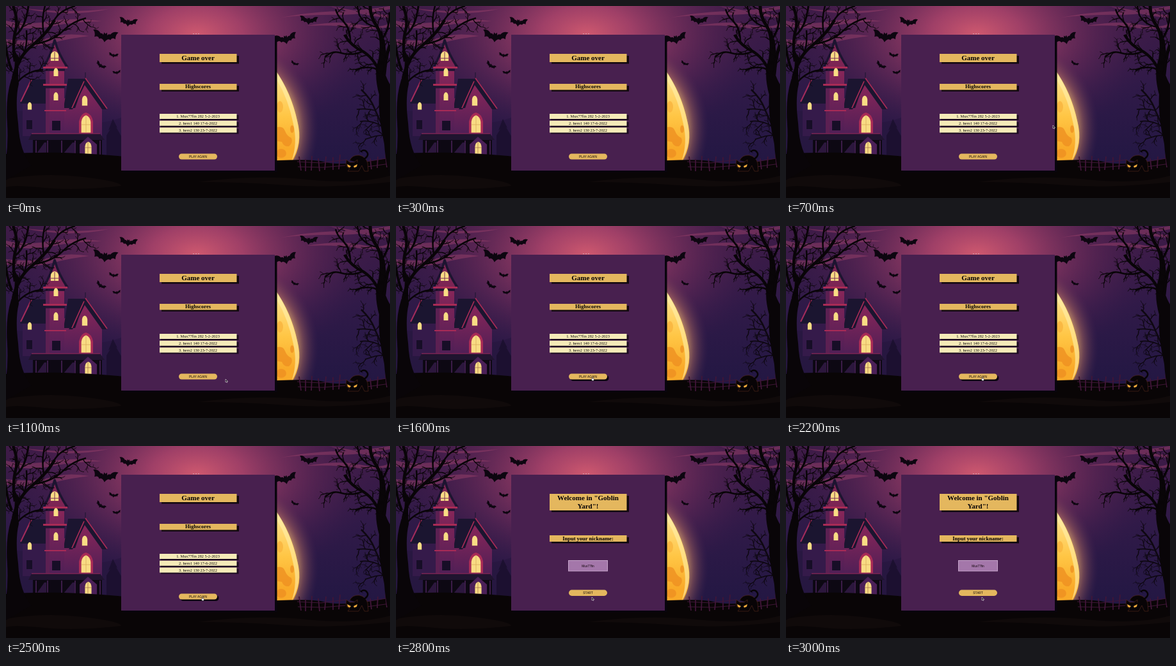
An HTML page that plays this animation: 600x301 px, repeating every 3.1 s.

```html
<!DOCTYPE html>
<html lang="en">
<head>
<meta charset="utf-8">
<title>Game over</title>
<style>
html, body { margin: 0; width: 100%; height: 100%; overflow: hidden; background: #080405; }
svg { position: absolute; left: 0; top: 0; display: block; }
.serif { font-family: "Liberation Serif", Times, serif; text-anchor: middle; fill: #050205; }
.sans { font: 4.8px "Liberation Sans", Arial, sans-serif; text-anchor: middle; fill: #100408; }
.h1 { font-size: 11px; font-weight: bold; }
.h2 { font-size: 8.5px; font-weight: bold; }
.row { font-size: 6.35px; }
.gold { fill: #e4b75e; }
.tree path { fill: none; stroke: #090508; stroke-linejoin: round; }
.tree .trunk { fill: #090508; stroke: none; }
.scores, .welcome, .hover, .arrow, .hand, .pointer { animation: 3.1s step-end infinite; }
.scores { animation-name: scores; }
.welcome { animation-name: welcome; }
.hover, .hand { animation-name: hover; }
.arrow { animation-name: arrow; }
.pointer { animation-name: move; }
@keyframes scores { 0% { opacity: 1 } 90.32%, 100% { opacity: 0 } }
@keyframes welcome { 0% { opacity: 0 } 90.32%, 100% { opacity: 1 } }
@keyframes hover { 0% { opacity: 0 } 41.93% { opacity: 1 } 90.32%, 100% { opacity: 0 } }
@keyframes arrow { 0% { opacity: 0 } 16.12% { opacity: 1 } 41.93% { opacity: 0 } 90.32%, 100% { opacity: 1 } }
@keyframes move {
  0% { transform: translate(468px, 150px) }
  16.12% { transform: translate(468px, 150px); animation-timing-function: steps(2) }
  22.57% { transform: translate(417px, 187px); animation-timing-function: steps(4) }
  35.48% { transform: translate(343px, 240px); animation-timing-function: steps(2) }
  41.93%, 100% { transform: translate(306px, 237px) }
}
</style>
</head>
<body>
<svg width="600" height="301" viewBox="0 0 600 301">
<defs>
  <linearGradient id="sky" x1="0" y1="0" x2="0" y2="1">
    <stop offset="0" stop-color="#3f1b47"/><stop offset=".4" stop-color="#301a48"/><stop offset=".85" stop-color="#221743"/>
  </linearGradient>
  <radialGradient id="haze" gradientUnits="userSpaceOnUse" cx="0" cy="0" r="1" gradientTransform="translate(298 45) scale(290 175)">
    <stop offset="0" stop-color="#cf596f"/><stop offset=".25" stop-color="#a8436a" stop-opacity=".92"/>
    <stop offset=".6" stop-color="#682a58" stop-opacity=".65"/><stop offset="1" stop-color="#3a1a4a" stop-opacity="0"/>
  </radialGradient>
  <radialGradient id="glow" gradientUnits="userSpaceOnUse" cx="0" cy="0" r="1" gradientTransform="translate(360 196) rotate(10) scale(128 140)">
    <stop offset=".7" stop-color="#f0bb70" stop-opacity=".85"/><stop offset=".82" stop-color="#a8685f" stop-opacity=".5"/>
    <stop offset="1" stop-color="#4a2552" stop-opacity="0"/>
  </radialGradient>
  <linearGradient id="moon" x1="0" y1="0" x2="0" y2="1">
    <stop offset=".1" stop-color="#ffe08a"/><stop offset=".5" stop-color="#ffc645"/><stop offset=".85" stop-color="#f9a928"/>
  </linearGradient>
  <linearGradient id="wall" x1="0" y1="0" x2="0" y2="1">
    <stop offset="0" stop-color="#8b2659"/><stop offset="1" stop-color="#4e1f56"/>
  </linearGradient>
  <path id="bat" d="M-18-7Q-11-9-7-3Q-4-4-3-1L-2-5L0-3L2-5L3-1Q4-4 7-3Q11-9 18-7Q14-3 15 3Q10 0 8 5Q4 2 0 9Q-4 2-8 5Q-10 0-15 3Q-14-3-18-7Z"/>
  <path id="lit" d="M-3.5 6V-2Q-3-6 0-7Q3-6 3.5-2V6Z" fill="#f9dc84"/>
</defs>

<rect width="600" height="301" fill="url(#sky)"/>
<rect width="600" height="260" fill="url(#haze)"/>
<g fill="#99406a" opacity=".5">
  <path d="M430 18Q480 9 520 8T600 0V5Q560 13 525 14Q475 13 430 18Z"/>
  <path d="M470 31Q520 22 552 29T600 27V33Q570 38 544 34Q510 29 470 31Z"/>
  <path d="M505 0Q545 8 600 15V19Q545 13 505 0Z"/>
  <path d="M0 23Q35 31 72 23Q108 18 150 24Q103 25 76 31Q38 39 0 32Z"/>
  <path d="M0 52Q44 58 78 47Q100 42 130 47Q98 51 80 56Q42 67 0 61Z"/>
  <path d="M25 3Q86 12 160 5Q96 19 25 3Z"/>
</g>
<path d="M0 168Q25 158 50 174T110 178Q140 190 180 175V250H0Z" fill="#27163f" opacity=".6"/>

<rect x="420" y="40" width="100" height="205" fill="url(#glow)"/>
<path d="M420 99Q446 136 455 180Q465 216 446 246H420Z" fill="url(#moon)"/>
<g fill="#ee8e20" opacity=".75">
  <path d="M424 190Q433 188 436 196T446 207Q449 214 442 220Q434 221 431 213L424 212Z"/>
  <ellipse cx="430" cy="231" rx="8" ry="7"/><ellipse cx="447" cy="193" rx="3" ry="6"/>
  <ellipse cx="428" cy="158" rx="5" ry="9" fill="#f9b33c"/>
</g>
<path d="M424 106Q446 140 455 180Q464 216 446 243Q456 216 449 185Q441 146 424 117Z" fill="#fff0ac" opacity=".6"/>

<path d="M157 238V203L163 193L160 195L167 177L174 191L172 190L180 204V240Z" fill="#1c1030"/>

<g>
  <path d="M26 148H66V204H26Z" fill="#351a4a"/>
  <path d="M39 115H62V153H22Z" fill="#1b1530"/>
  <path d="M40 115L23 150" stroke="#a32c5c" stroke-width="2"/>
  <path d="M90 146L122 119L150 158V204H90Z" fill="url(#wall)"/>
  <path d="M97 114H124L108 160H90Z" fill="#1b1530"/>
  <path d="M124 104V116" stroke="#1b1530"/>
  <path d="M124 113L158 162H150L123 124L104 162H98Z" fill="#1b1530"/>
  <path d="M124 113L158 161M122 118L103 160" fill="none" stroke="#a82b56" stroke-width="1.700"/>
  <path d="M62 94H91V204H62Z" fill="url(#wall)"/>
  <path d="M62 94H68V204H62Z" fill="#5c2052"/>
  <path d="M62 95Q66 72 76 60Q86 74 92 95Z" fill="#7c2554"/>
  <path d="M58 97Q70 78 76 53Q82 76 96 96" fill="none" stroke="#1d1430" stroke-width="3.500"/>
  <path d="M76 45V60" stroke="#1d1430"/>
  <path d="M58 95H96V98H58ZM58 122H95V125H58ZM60 163H94V165H60Z" fill="#a82b56"/>
  <path d="M62 98H92V102H62ZM62 125H92V129H62Z" fill="#241535"/>
  <use href="#lit" transform="translate(76 79) scale(1.75 1.15)"/>
  <path d="M76 72V87M70 82H82" stroke="#773052"/>
  <use href="#lit" x="78" y="104"/><use href="#lit" x="78" y="142"/>
  <use href="#lit" transform="translate(123 149) scale(1.2)"/>
  <use href="#lit" transform="translate(37 157) scale(.9)"/>
  <path d="M114 200V181Q117 168 125 167Q134 169 136 181V200Z" fill="#a82b56"/>
  <use href="#lit" transform="translate(125 186) scale(2.1)"/>
  <path d="M125 172V198M118 186H132" stroke="#d7a155" stroke-width=".7"/>
  <path d="M32 193V179H41V193ZM72 180H85V195H72Z" fill="#170e27"/>
  <path d="M40 200H147L154 210H35Z" fill="#20142f"/>
  <path d="M40 200H147" stroke="#7c2554" stroke-width="1.300"/>
  <path d="M42 210H150V234H42Z" fill="#0d0813"/>
  <path d="M47 211V233M65 211V233M87 211V233M108 211V233M147 211V233" stroke="#3c1c49" stroke-width="2"/>
  <path d="M48 231L60 214H63V231ZM90 231L104 214H107V231Z" fill="#2c173d"/>
  <path d="M115 233V217L128 205L142 217V233Z" fill="#4c2058"/>
  <use href="#lit" transform="translate(128.500 223) scale(1.45)"/>
  <path d="M128 213V231M123 222H134" stroke="#a36a4c" stroke-width=".7"/>
</g>

<path d="M0 232Q55 228 116 231T240 242T390 244T500 245T600 238V301H0Z" fill="#090506"/>
<path d="M0 271Q60 261 120 268T180 282Q110 290 60 285T0 284ZM300 276Q390 264 470 272T600 266V276Q510 286 440 281T300 276Z" fill="#100a0a"/>

<g fill="none" stroke="#401638">
  <path d="M455 244L492 246L532 241M456 252L495 253L530 250M563 244L600 238M564 252L600 247"/>
  <path d="M458 236L461 258M468 240V259M478 235L477 258M488 239L490 259M500 236L498 257M511 237V257M522 233L520 256M569 239L571 256M581 236L580 254M593 232L595 253" stroke-width="1.800"/>
</g>

<g class="tree" opacity=".85">
  <path class="limb" d="M600 211Q586 185 576 161Q570 145 555 131" stroke-width="2.500"/>
  <path class="limb" d="M578 164Q565 160 548 162M587 188Q570 178 553 181M589 191Q593 166 600 155M592 202L577 204L561 209" stroke-width="1.700"/>
</g>
<g class="tree">
  <path class="trunk" d="M-7 273Q5 231 2 185Q-1 144 8 116Q17 97 12 67L20 81Q18 104 20 122Q14 146 19 184Q21 228 40 250L0 273Z"/>
  <path class="limb" d="M11 113Q18 80 42 61Q63 44 76 22" stroke-width="4.500"/>
  <path class="limb" d="M14 87Q9 58 16 34Q18 17 11 0" stroke-width="4.500"/>
  <path class="limb" d="M42 60Q72 56 89 39Q104 24 125 19" stroke-width="2.500"/>
  <path class="limb" d="M59 44Q55 20 61 0" stroke-width="2.500"/>
  <path class="limb" d="M75 23Q83 7 108 0" stroke-width="2.500"/>
  <path class="limb" d="M15 46Q31 33 35 0" stroke-width="3"/>
  <path class="limb" d="M9 101Q2 84-2 53" stroke-width="4"/>
  <path class="limb" d="M16 122Q32 101 58 100" stroke-width="2.500"/>
  <path class="limb" d="M24 78Q34 70 32 38" stroke-width="2.500"/>
</g>
<g class="tree">
  <path class="trunk" d="M606 280Q594 260 591 216Q581 172 583 139Q574 106 582 84Q587 56 579 34L588 41Q598 76 592 105Q598 123 606 130Z"/>
  <path class="limb" d="M587 115Q580 86 559 72Q539 63 529 45" stroke-width="4.500"/>
  <path class="limb" d="M587 84Q593 55 579 31Q569 17 569 0" stroke-width="5"/>
  <path class="limb" d="M591 108Q594 75 600 61" stroke-width="5"/>
  <path class="limb" d="M558 71Q540 79 521 73Q508 70 499 80" stroke-width="2.500"/>
  <path class="limb" d="M538 58Q539 36 526 23Q518 16 515 5" stroke-width="2.500"/>
  <path class="limb" d="M580 33Q561 30 552 14L549 0" stroke-width="2.500"/>
  <path class="limb" d="M586 54Q600 37 599 10" stroke-width="3"/>
  <path class="limb" d="M581 99Q564 93 546 100" stroke-width="2.500"/>
</g>

<g fill="#0d0610">
  <use href="#bat" transform="translate(155 47) rotate(7) scale(1.1)"/>
  <use href="#bat" transform="translate(191 25) rotate(8) scale(.8)"/>
  <use href="#bat" transform="translate(437 51) rotate(-11) scale(.98)"/>
  <use href="#bat" transform="translate(473 22) rotate(5) scale(.8)"/>
  <use href="#bat" transform="translate(451 90) rotate(25) scale(.36)"/>
  <use href="#bat" transform="translate(168 77) rotate(9) scale(.42)"/>
  <use href="#bat" transform="translate(148 93) rotate(35) scale(.48)"/>
  <use href="#bat" transform="translate(173 104) rotate(-8) scale(.36)"/>
</g>

<g fill="#080406" stroke-linecap="round">
  <path d="M537 242Q541 233 552 234Q562 236 565 246L566 259H560L556 250L551 259H534L537 255Q529 252 532 241L537 245H544L549 241V245" stroke="#5a2a1c" stroke-width=".6"/>
  <path d="M561 239Q569 233 562 227Q558 225 555 228" fill="none" stroke="#080406" stroke-width="2.500"/>
  <path d="M533 248L539 251L537 253.500L534 252ZM543 251L549 248L548 252L544 253.500Z" fill="#f0a83a"/>
</g>

<path d="M292 43.500H294M296 43.500H298M300 43.500H302" stroke="#d8a9bc" stroke-width=".8"/>
<path d="M183 48H423.500V260.500H183Z" fill="#09050d"/>
<path d="M180 45H420V258H180Z" fill="#48204f"/>

<g class="scores">
  <path d="M243 78H364V90.500H243ZM243 125H364V134H243Z" fill="#12080f"/>
  <path class="gold" d="M240 75H360.500V88H240ZM240 122H360.500V131.500H240Z"/>
  <path d="M242 171H363.500V179H242ZM242 182H363.500V190H242ZM242 192.500H363.500V200.500H242Z" fill="#1c0c20"/>
  <path d="M240 169H360.500V177H240ZM240 179.700H360.500V187.700H240ZM240 190.400H360.500V198.400H240Z" fill="#f5ebb8"/>
  <g class="serif">
    <text class="h1" x="300" y="85">Game over</text>
    <text class="h2" x="300" y="129.400">Highscores</text>
    <text class="row" x="300" y="175.200">1. Mux77fin 282 5-2-2023</text>
    <text class="row" x="300" y="185.900">2. hero1 140 17-6-2022</text>
    <text class="row" x="300" y="196.600">3. hero2 130 23-7-2022</text>
  </g>
  <rect class="hover" x="272.500" y="234" width="60" height="9" rx="4.500" fill="#0d0610"/>
  <rect class="gold" x="270" y="231.500" width="60" height="9" rx="4.500"/>
  <text class="sans" x="300" y="237.700">PLAY AGAIN</text>
</g>

<g class="welcome">
  <path d="M243 78H364V103.500H243ZM243 143H364V152.500H243Z" fill="#12080f"/>
  <path class="gold" d="M240 75H360.500V101H240ZM240 140H360.500V150H240Z"/>
  <g class="serif">
    <text class="h1" x="300" y="85">Welcome in "Goblin</text>
    <text class="h1" x="300" y="97.700">Yard"!</text>
    <text class="h2" x="300" y="147.700">Input your nickname:</text>
  </g>
  <rect x="269.500" y="179.500" width="61" height="16.500" fill="#a477aa" stroke="#c6a4ca"/>
  <text class="sans" x="300" y="189.500">Mux77fin</text>
  <rect class="gold" x="270" y="225.500" width="60" height="9.500" rx="4.700"/>
  <text class="sans" x="300" y="232">START</text>
</g>

<g class="pointer" stroke-linejoin="round">
  <path class="arrow" d="M0 0V5L1.200 4L2 5.600L2.900 5.100L2.200 3.600H3.700Z" fill="#17101b" stroke="#e8e0e8" stroke-width=".6"/>
  <path class="hand" d="M.3.300Q1-.3 1.300.600V2L3.300 2.500V4.300L2.700 5.600H.5L-1 3.300L-.5 2.800L.3 3.300Z" fill="#fff" stroke="#17101b" stroke-width=".5"/>
</g>
</svg>
<script>
let seed = 11;
const rand = () => (seed = seed * 16807 % 2147483647) / 2147483647;

// A crooked twig that forks into thinner ones.
function twig(tree, x, y, angle, size, width) {
  let d = `M${x} ${y}`;
  for (let i = 0; i < 3; i++) {
    angle += rand() - .5;
    x += Math.cos(angle) * size / 3;
    y += Math.sin(angle) * size / 3;
    d += `L${x.toFixed(1)} ${y.toFixed(1)}`;
    if (size > 8) twig(tree, x, y, angle + (i % 2 ? .8 : -.8), size * .5, width * .65);
  }
  const path = document.createElementNS("http://www.w3.org/2000/svg", "path");
  path.setAttribute("d", d);
  path.setAttribute("stroke-width", width);
  tree.append(path);
}

document.querySelectorAll(".limb").forEach(limb => {
  const length = limb.getTotalLength();
  let side = 1;
  for (let at = 8; at <= length; at += 9) {
    const a = limb.getPointAtLength(at - 1), b = limb.getPointAtLength(at);
    if (Math.hypot(b.x - a.x, b.y - a.y) > 2) continue;
    side = -side;
    twig(limb.parentNode, b.x, b.y, Math.atan2(b.y - a.y, b.x - a.x) + side * .8, 9 + rand() * 9, 1.3);
  }
});
</script>
</body>
</html>
```
